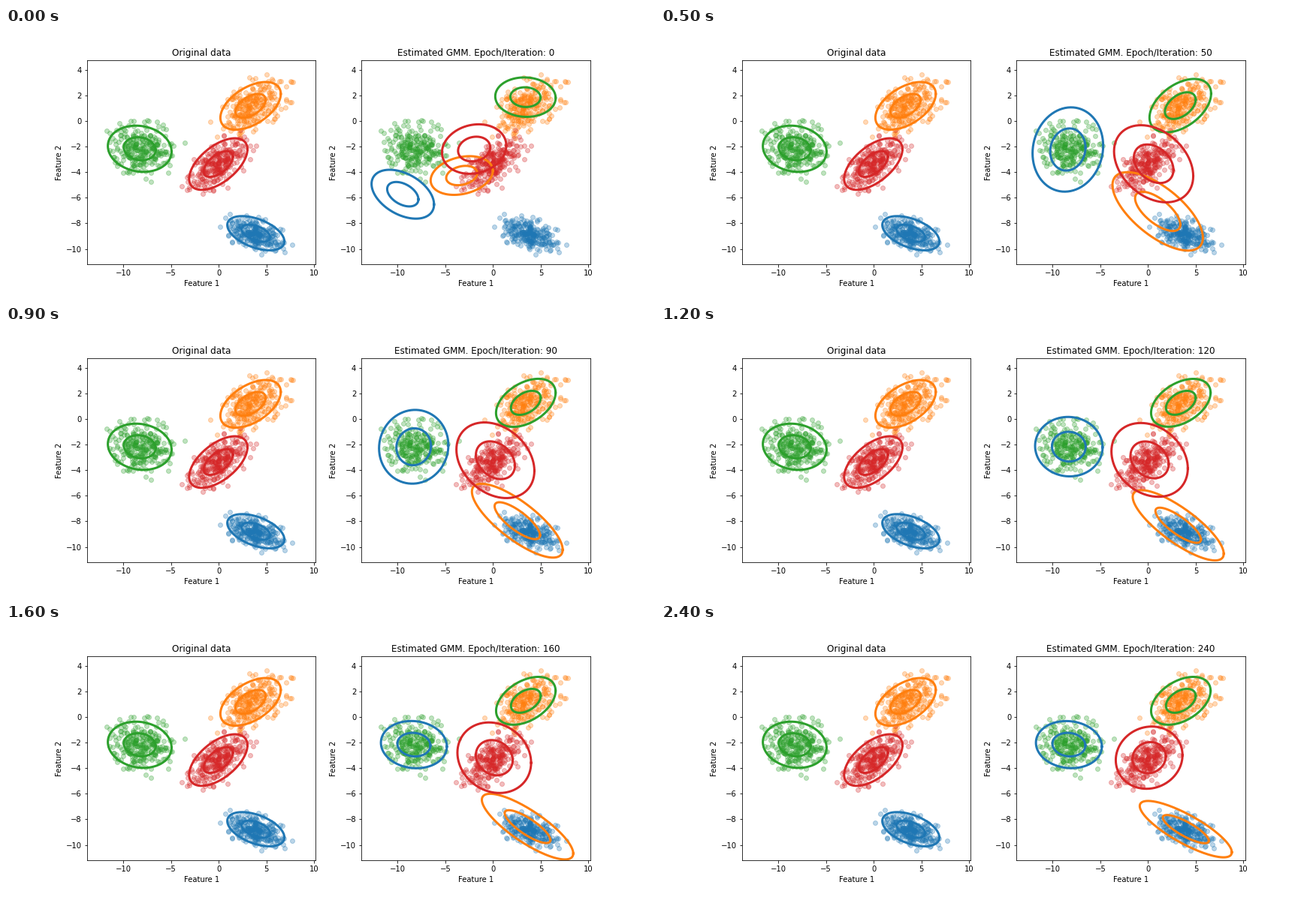
These frames come from a looping animation (864 px wide and 360 px high, 2500 ms). A matplotlib script:

```python
import numpy as np
import matplotlib.pyplot as plt
from matplotlib.animation import FuncAnimation

FRAMES, INTERVAL, STEP = 25, 100, 10
LAST, TURN = (FRAMES - 1) * STEP, 50         # last iteration, end of the first rush
W, H, DPI = 864, 360, 72
XLIM, YLIM = (-13.795, 10.17), (-11.2, 4.751)
X0, Y0, SX, SY = 283.2, 124.15, 12.7, 17.04  # pixel place of (0, 0), pixels per unit
PANEL = 365.2                                # distance between the two panels
POINTS = 260
COLORS = ["C0", "C1", "C2", "C3"]


def settle(k):
    """Exponential approach."""
    return lambda p: (1 - np.exp(-k * p)) / (1 - np.exp(-k))


def power(n):
    return lambda p: p**n


def ramp(end):
    """Smooth step that is over at `end`."""
    def ease(p):
        s = min(p / end, 1)
        return s * s * (3 - 2 * s)
    return ease


# Poses: centre x, centre y, half width, half height (pixels), correlation
TRUE = [
    (332.6, 273.6, 38.0, 22.8, -0.48),
    (325.6, 103.8, 40.2, 31.8, 0.50),
    (178.0, 161.0, 42.4, 30.8, -0.12),
    (282.6, 181.4, 38.8, 34.4, 0.57),
]

# Start, turning and final pose, then easing of centre, size and correlation
FITS = [
    ((528.2, 221.6, 41.6, 32.6, -0.42), (541.6, 162.0, 47.0, 56.2, 0.09),
     (543.0, 160.8, 43.9, 31.4, -0.08), settle(8), ramp(0.6), ramp(0.6)),
    ((606.7, 196.7, 41.4, 25.8, 0.25), (661.2, 244.5, 60.2, 52.3, -0.67),
     (698.6, 273.5, 61.3, 37.6, -0.82), settle(3.3), power(1), settle(7)),
    ((691.5, 92.2, 40.2, 26.3, -0.04), (691.3, 103.5, 41.0, 35.6, 0.45),
     (692.0, 102.4, 39.6, 31.9, 0.42), settle(15), settle(15), settle(15)),
    ((623.2, 161.4, 42.8, 33.0, 0.14), (655.8, 181.0, 52.7, 51.4, -0.32),
     (649.8, 178.2, 44.4, 41.5, 0.08), settle(6), power(1.5), power(1.5)),
]


def to_data(px, py):
    return (px - X0) / SX, (Y0 - py) / SY


def tilt(pose, u, v):
    """Map unit coordinates onto a tilted ellipse."""
    cx, cy, a, b, rho = pose
    return to_data(cx + a * u, cy - b * (rho * u + np.sqrt(1 - rho**2) * v))


def ring(pose, scale):
    t = np.linspace(0, 2 * np.pi, 161)
    return tilt(pose, scale * np.cos(t), scale * np.sin(t))


def cloud(rng, pose):
    """Normal sample whose two sigma contour is the ellipse."""
    z = rng.normal(size=(2 * POINTS, 2))
    z = z[np.hypot(*z.T) < 3][:POINTS]
    return tilt(pose, *z.T / 2)


def fit(part, iteration):
    start, turn, end, move, size, skew = part
    start, turn, end = map(np.array, (start, turn, end))
    if iteration < TURN:
        q = iteration / TURN
        pose = start + (turn - start) * q * (1.6 - 0.6 * q)
    else:
        p = (iteration - TURN) / (LAST - TURN)
        m, s, k = move(p), size(p), skew(p)
        pose = turn + (end - turn) * np.array([m, m, s, s, k])
    pose[0] -= PANEL
    return pose


def draw_rings(ax, pose, color):
    return [ax.plot(*ring(pose, s), color=color, lw=3)[0] for s in (0.5, 1)]


plt.rcParams.update({"font.family": "DejaVu Sans", "font.size": 10})
fig, axes = plt.subplots(1, 2, figsize=(W / DPI, H / DPI), dpi=DPI,
                         facecolor="white")
fig.subplots_adjust(left=0.125, right=0.9, bottom=0.125, top=0.88, wspace=0.2)

rng = np.random.default_rng(7)
clouds = [cloud(rng, pose) for pose in TRUE]

for ax in axes:
    for pts, color in zip(clouds, COLORS):
        ax.scatter(*pts, color=color, alpha=0.3)
    ax.set_xlabel("Feature 1")
    ax.set_ylabel("Feature 2")
    ax.set_xticks(range(-10, 11, 5))
    ax.set_yticks(range(-10, 5, 2))

for pose, color in zip(TRUE, COLORS):
    draw_rings(axes[0], pose, color)
fitted = [draw_rings(axes[1], fit(p, 0), c) for p, c in zip(FITS, COLORS)]
for ax in axes:
    ax.set(xlim=XLIM, ylim=YLIM)

axes[0].set_title("Original data")
title = axes[1].set_title("")


def update(i):
    iteration = i * STEP
    title.set_text(f"Estimated GMM. Epoch/Iteration: {iteration}")
    for part, (inner, outer) in zip(FITS, fitted):
        pose = fit(part, iteration)
        inner.set_data(*ring(pose, 0.5))
        outer.set_data(*ring(pose, 1))
    return [title, *sum(fitted, [])]


anim = FuncAnimation(fig, update, frames=FRAMES, interval=INTERVAL,
                     repeat=True, repeat_delay=0, blit=False)
plt.show()
```
